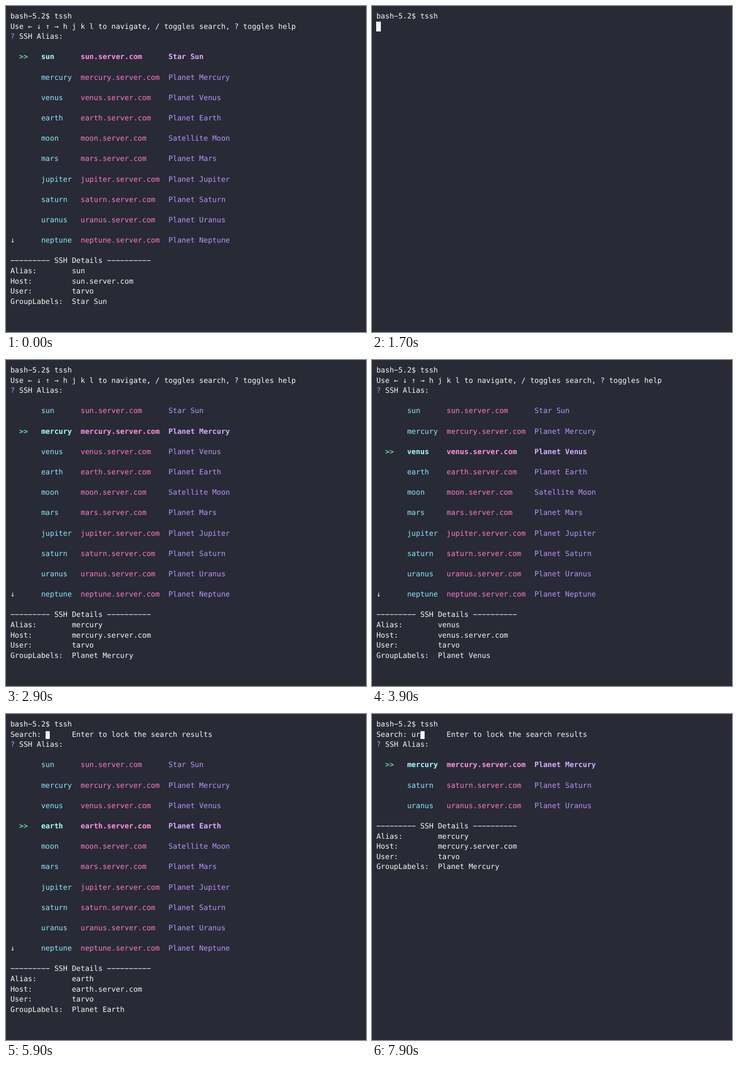
These frames come from a looping animation (691 px wide and 627 px high, 8 s). An HTML page:

```html
<!DOCTYPE html>
<html lang="en">
<head>
<meta charset="utf-8">
<title>Terminal session</title>
<style>
  html, body { margin: 0; width: 100%; height: 100%; overflow: hidden; background: #282a36; }
  #screen {
    position: relative; width: 691px; height: 627px; overflow: hidden;
    font: 14px/20px "DejaVu Sans Mono", monospace;
    text-rendering: geometricPrecision;
    color: #f8f8f2;
  }
  #screen span { position: absolute; white-space: pre; }
  #screen .caret { width: 8.43px; height: 19.6px; background: #f8f8f2; }
  #screen .block { width: 8.43px; height: 15px; background: #f8f8f2; }
  .cyan { color: #8be9fd; }
  .pink { color: #ff79c6; }
  .purple { color: #bd93f9; }
  .bold { font-weight: bold; }
  .green { color: #64d79a; }
  .bold.cyan { color: #a4ffff; }
  .bold.pink { color: #ff92df; }
  .bold.purple { color: #d6acff; }
</style>
</head>
<body>
<div id="screen"></div>
<script>
const LOOP = 8000, CELL = 8.428, ROW = 19.6, LEFT = 8.4, TOP = 10;
const PROMPT = 'bash-5.2$ ';
const HELP = 'Use ← ↓ ↑ → h j k l to navigate, / toggles search, ? toggles help';
const VISIBLE = 10;
const USER = 'tarvo';
const screen = document.getElementById('screen');

const bodies = ['sun', 'mercury', 'venus', 'earth', 'moon', 'mars',
  'jupiter', 'saturn', 'uranus', 'neptune', 'pluto'].map(alias => {
  const kind = { sun: 'Star', moon: 'Satellite' }[alias] || 'Planet';
  return {
    alias,
    host: alias + '.server.com',
    label: kind + ' ' + alias[0].toUpperCase() + alias.slice(1)
  };
});

function put(col, row, text, style = '', dy = 0) {
  const el = document.createElement('span');
  el.className = style;
  // the wide dash glyph matches the terminal's hyphen
  el.textContent = text.replace(/-/g, '\u2212');
  el.style.left = LEFT + col * CELL + 'px';
  el.style.top = TOP + row * ROW + dy + 'px';
  screen.append(el);
}

const caret = (col, row) => put(col, row, '', 'caret');

function shell(typed, entered) {
  put(0, 0, PROMPT + typed);
  if (entered) caret(0, 1);
  else caret(PROMPT.length + typed.length, 0);
}

function details(row, item) {
  put(0, row, '-'.repeat(9) + ' SSH Details ' + '-'.repeat(10));
  const fields = { Alias: item.alias, Host: item.host, User: USER, GroupLabels: item.label };
  Object.entries(fields).forEach(([name, value], i) => {
    put(0, row + 1 + i, name + ':');
    put(14, row + 1 + i, value);
  });
}

function menu(selected, query) {
  put(0, 0, PROMPT + 'tssh');
  if (query === undefined) {
    put(0, 1, HELP);
  } else {
    put(0, 1, 'Search: ' + query);
    put(8 + query.length, 1, '', 'block', 3.2);
    put(14 + query.length, 1, 'Enter to lock the search results');
  }
  put(0, 2, '?', 'purple');
  put(2, 2, 'SSH Alias:');

  const found = bodies.filter(b => b.alias.includes(query || ''));
  const shown = found.slice(0, VISIBLE);
  shown.forEach((item, i) => {
    const row = 4 + 2 * i;
    const weight = i === selected ? 'bold ' : '';
    if (weight) put(2, row, '>>', 'bold green');
    put(7, row, item.alias, weight + 'cyan');
    put(16, row, item.host, weight + 'pink');
    put(36, row, item.label, weight + 'purple');
  });
  const end = 4 + 2 * shown.length;
  if (found.length > VISIBLE) put(0, end - 2, '↓');
  details(end, shown[selected]);
}

const steps = [
  [0, () => menu(0)],
  [100, () => shell('')],
  [600, () => shell('t')],
  [800, () => shell('ts')],
  [1000, () => shell('tss')],
  [1200, () => shell('tssh')],
  [1700, () => shell('tssh', true)],
  [1900, () => menu(0)],
  [2900, () => menu(1)],
  [3900, () => menu(2)],
  [4900, () => menu(3)],
  [5900, () => menu(3, '')],
  [6900, () => menu(0, 'u')],
  [7900, () => menu(0, 'ur')]
];

let current;
function tick() {
  const time = performance.now() % LOOP;
  const step = steps.findLast(([start]) => start <= time);
  if (step !== current) {
    current = step;
    screen.replaceChildren();
    step[1]();
  }
  requestAnimationFrame(tick);
}
tick();
</script>
</body>
</html>
```
